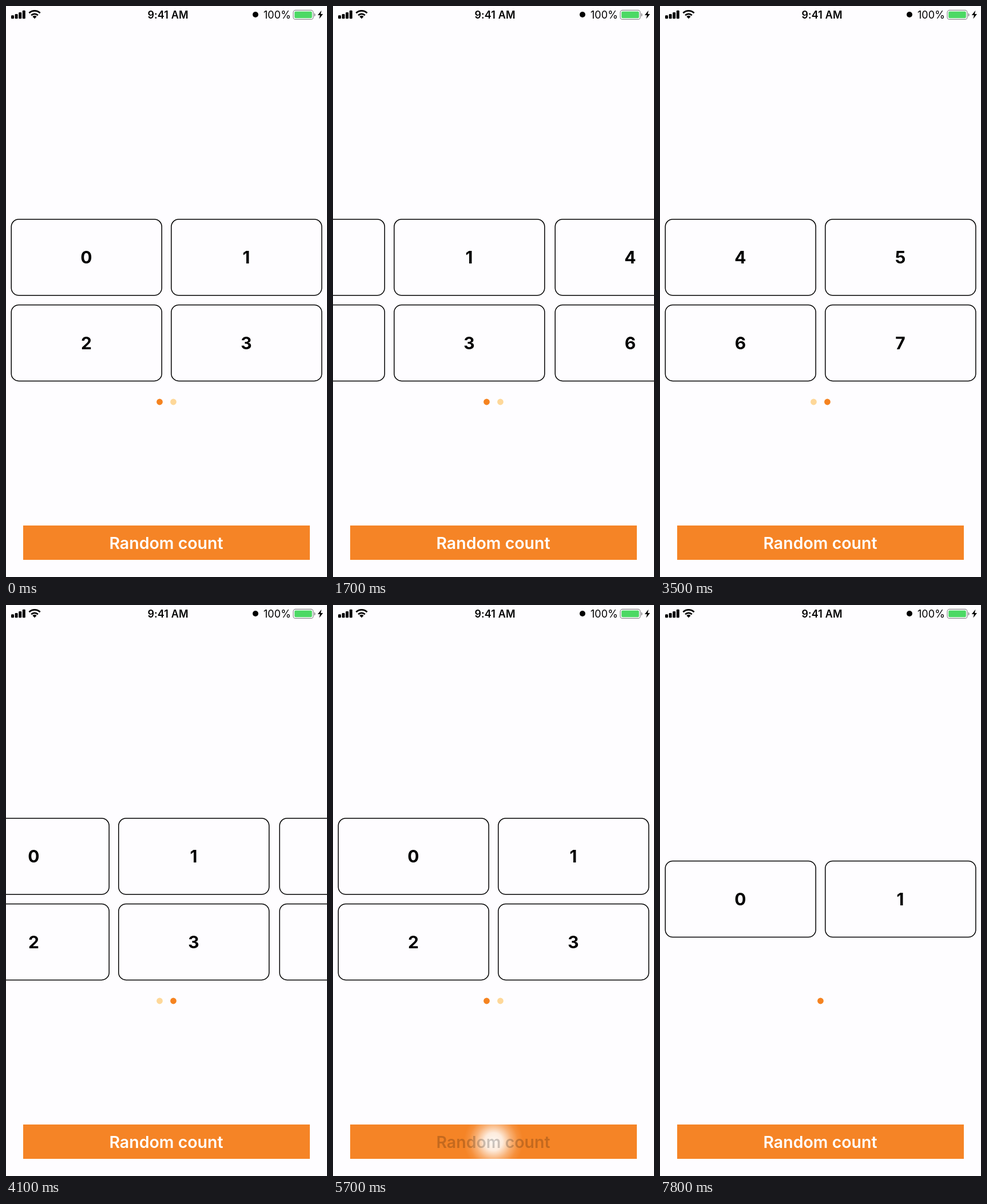
An HTML page that plays this animation: 561x998 px, repeating every 8000 ms.

```html
<!DOCTYPE html>
<html lang="en">
<head>
<meta charset="utf-8">
<title>Paged grid</title>
<style>
  html, body { margin: 0; width: 100%; height: 100%; overflow: hidden; background: #fefdff; }
  svg { display: block; width: 561px; height: 998px; font-family: Inter, Roboto, sans-serif; }
  text { text-anchor: middle; }
  .card rect { fill: none; stroke: #000; stroke-width: 1.5; }
  .card text { font-size: 30px; font-weight: 700; }
  .label { font-size: 28.5px; font-weight: 600; }
  .time { font-size: 18px; font-weight: 600; letter-spacing: .1px; }
  .charge { font-size: 18px; letter-spacing: .1px; }
</style>
</head>
<body>
<svg viewBox="0 0 561 998">
  <defs>
    <radialGradient id="shine">
      <stop offset="0" stop-color="#fff" stop-opacity=".94"/>
      <stop offset=".3" stop-color="#fff" stop-opacity=".84"/>
      <stop offset=".6" stop-color="#fff" stop-opacity=".36"/>
      <stop offset=".82" stop-color="#fff" stop-opacity=".1"/>
      <stop offset="1" stop-color="#fff" stop-opacity="0"/>
    </radialGradient>
  </defs>

  <g id="status">
    <rect x="9" y="16.3" width="5" height="6" rx="1.4"/>
    <rect x="15.6" y="14" width="5" height="8.3" rx="1.4"/>
    <rect x="22.2" y="11" width="5" height="11.3" rx="1.4"/>
    <rect x="28.8" y="7.8" width="5" height="14.5" rx="1.4"/>
    <path d="M50 22.3l-3.6-3.8a5.2 5.2 0 0 1 7.2 0z"/>
    <path d="M44.2 16.2a8.4 8.4 0 0 1 11.6 0M40.4 12.2a13.9 13.9 0 0 1 19.2 0" fill="none" stroke="#000" stroke-width="2.9"/>
    <text class="time" x="283" y="21.6">9:41 AM</text>
    <circle cx="436" cy="15" r="5"/>
    <text class="charge" x="474" y="21.6">100%</text>
    <rect x="502" y="7.4" width="35" height="16" rx="4" fill="none" stroke="#8b8b8d" stroke-width="1.2"/>
    <rect x="504.2" y="9.6" width="30.6" height="11.6" rx="2" fill="#4cd964"/>
    <path d="M538.6 12.2q2 1 2 3.2t-2 3.2z" fill="#8b8b8d"/>
    <path d="M551.4 7.8l-6.6 8.2h4l-1.4 6.4 6.6-8.4h-4z"/>
  </g>

  <g id="cards"></g>
  <g id="dots"></g>

  <rect x="30" y="908" width="501" height="60" fill="#f58426"/>
  <circle id="glow" cx="280.5" cy="938" r="52" fill="url(#shine)"/>
  <text class="label" id="label" x="280" y="948.5">Random count</text>
</svg>
<script>
const LOOP = 8000, STEP = 100, PAGE = 561, DECAY = .0084;
const ON = '#f58320', OFF = '#fed899';
const PRESS = 5700, RELEASE = 5900;
const $ = id => document.getElementById(id);

function add(parent, tag, attrs, text) {
  const el = document.createElementNS('http://www.w3.org/2000/svg', tag);
  for (const key in attrs) el.setAttribute(key, attrs[key]);
  if (text !== undefined) el.textContent = text;
  return parent.appendChild(el);
}

const cards = Array.from({ length: 8 }, (_, i) => {
  const x = 9.25 + (i >> 2) * PAGE + (i & 1) * 279.6;
  const y = 372.8 + (i >> 1 & 1) * 149.6;
  const g = add($('cards'), 'g', { class: 'card' });
  add(g, 'rect', { x, y, width: 263, height: 133, rx: 13 });
  add(g, 'text', { x: x + 131.2, y: y + 77.2 }, i);
  return g;
});
const dots = [0, 1].map(() => add($('dots'), 'circle', { cy: 692, r: 5.4 }));

// Finger drag, then exponential settling, forward and back.
function scroll(t) {
  if (t < 1300 || t >= 4500) return 0;
  if (t < 1700) return 182 * ((t - 1300) / 400) ** 2;
  if (t < 2200) return PAGE - 379 * Math.exp(-DECAY * (t - 1700));
  if (t < 3900) return PAGE;
  return 494 * Math.exp(-DECAY * (t - 3900));
}

function draw(t) {
  const few = t >= RELEASE;
  const pressed = t >= PRESS && !few;
  const page = t >= 2200 && t < 4500 ? 1 : 0;

  $('cards').setAttribute('transform', `translate(${-scroll(t)} ${few ? 74.7 : 0})`);
  cards.forEach((card, i) => card.setAttribute('visibility', few && i > 1 ? 'hidden' : 'visible'));
  dots.forEach((dot, i) => {
    dot.setAttribute('cx', few ? 280.5 : 268.5 + 24 * i);
    dot.setAttribute('fill', i === page ? ON : OFF);
    dot.setAttribute('visibility', few && i ? 'hidden' : 'visible');
  });

  const fade = Math.max(0, 1 - (t - RELEASE) / 500);
  $('glow').setAttribute('opacity', pressed ? 1 : few ? fade : 0);
  $('label').setAttribute('fill', pressed ? 'rgba(0,0,0,.2)' : '#fff');
}

const start = performance.now();
function tick() {
  const t = (performance.now() - start) % LOOP;
  draw(Math.floor(t / STEP) * STEP);
  requestAnimationFrame(tick);
}
tick();
</script>
</body>
</html>
```
